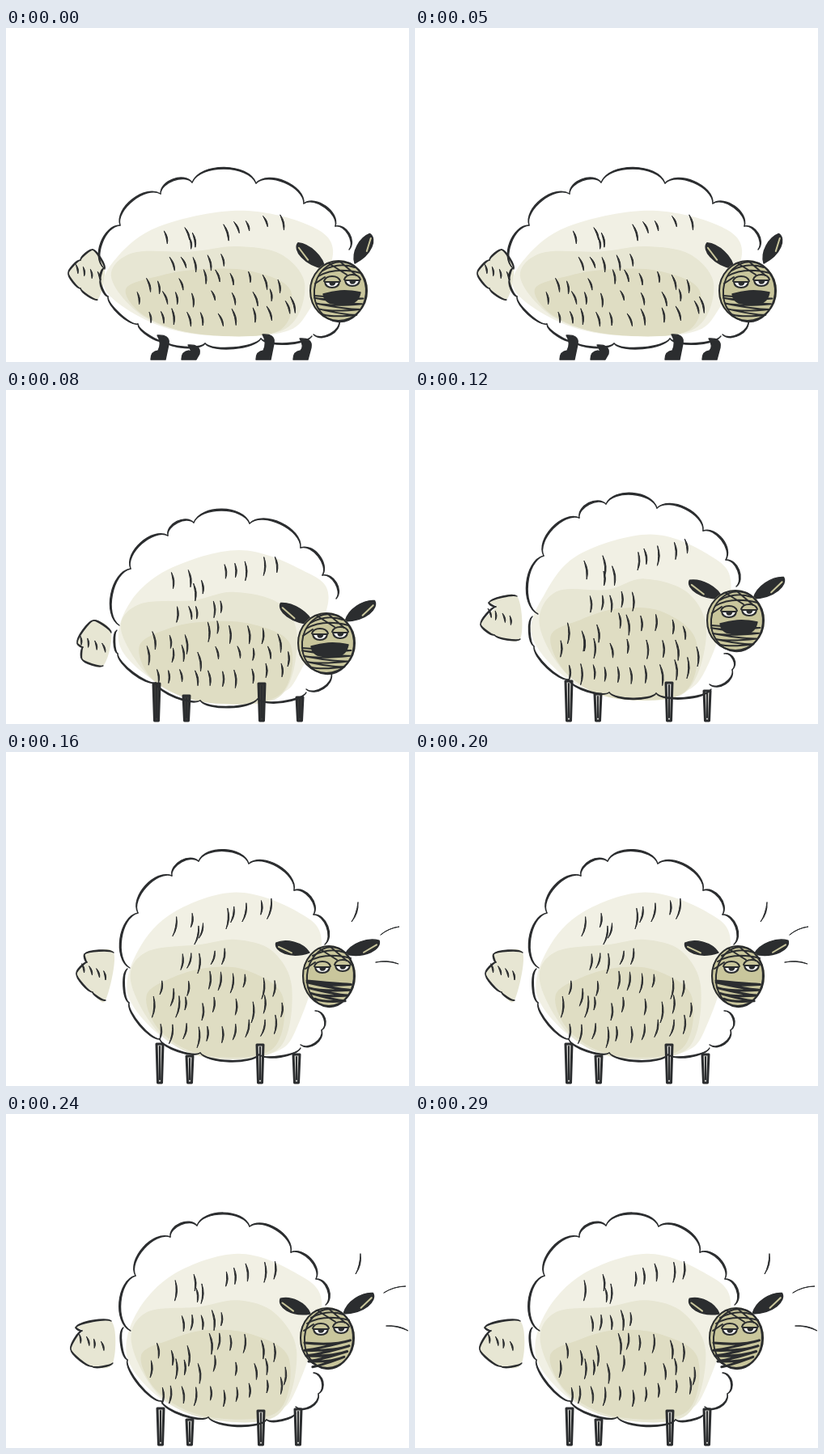
An HTML page for the animation above (0.32 s loop, 498 by 413 pixels).

```html
<!DOCTYPE html>
<html lang="en">
<head>
<meta charset="utf-8">
<title>Woolly sheep</title>
<style>
  html, body { margin: 0; width: 100%; height: 100%; overflow: hidden; background: #fff; }
  svg { display: block; width: 100%; height: 100%; }
  .pose { visibility: hidden; animation: 320ms step-end infinite; }
  #squash { animation-name: squash; }
  #rise { animation-name: rise; }
  #stretch { animation-name: stretch; }
  #hold { animation-name: hold; }
  #settle { animation-name: settle; }
  @keyframes squash { 0% { visibility: visible } 25%, 100% { visibility: hidden } }
  @keyframes rise { 0% { visibility: hidden } 25% { visibility: visible } 37.5%, 100% { visibility: hidden } }
  @keyframes stretch { 0% { visibility: hidden } 37.5% { visibility: visible } 50%, 100% { visibility: hidden } }
  @keyframes hold { 0% { visibility: hidden } 50% { visibility: visible } 75%, 100% { visibility: hidden } }
  @keyframes settle { 0% { visibility: hidden } 75%, 100% { visibility: visible } }
  .ink { fill: #2b2d2f; stroke: #2b2d2f; stroke-width: 1.4; stroke-linecap: round; stroke-linejoin: round; }
  .line { fill: none; stroke: #2b2d2f; stroke-width: 2; stroke-linecap: round; stroke-linejoin: round; }
  .bold { stroke-width: 3; }
  .tick { stroke-width: 1; }
  .light { fill: #f1f0e4; }
  .mid { fill: #e7e6d3; }
  .deep { fill: #dfddc3; }
  .skin { fill: #c9c69c; }
  .glint { stroke: #c9c69c; }
  .white { fill: #fff; }
  .dark { fill: #3a3b39; }
  .pale { fill: #d5d5d0; }
</style>
</head>
<body>
<svg viewBox="0 0 498 413" preserveAspectRatio="none"></svg>
<script>
const svg = document.querySelector('svg');

function groups(s, n = 2) {
  const a = s.trim().split(/\s+/).map(Number), out = [];
  for (let i = 0; i + n <= a.length; i += n) out.push(a.slice(i, i + n));
  return out;
}
const path = (cls, d) => `<path class="${cls}" d="${d}"/>`;

function random(seed) {
  return () => (seed = seed * 16807 % 2147483647) / 2147483647;
}

// Closed smooth shape through a few points
function blob(cls, p) {
  const n = p.length, at = i => p[(i + n) % n];
  let d = `M${p[0]}`;
  p.forEach((b, i) => {
    const a = at(i - 1), c = at(i + 1), e = at(i + 2);
    d += `C${b.map((v, k) => v + (c[k] - a[k]) / 6)} ${c.map((v, k) => v - (e[k] - b[k]) / 6)} ${c}`;
  });
  return path(cls, d + 'Z');
}

// Brush arc bulging to the left of its direction, thick in the middle
function arc([x, y], [u, v], bulge, base, thick) {
  const dx = u - x, dy = v - y, l = Math.hypot(dx, dy);
  const point = (f, h) => [x + dx * f + dy / l * h, y + dy * f - dx / l * h];
  const h = l * bulge + base, g = h - thick;
  return path('ink', `M${x} ${y}C${point(.12, h)} ${point(.88, h)} ${u} ${v}C${point(.88, g)} ${point(.12, g)} ${x} ${y}Z`);
}
const chain = (p, bulge, base, thick) =>
  p.slice(1).map((q, i) => arc(p[i], q, bulge, base, thick)).join('');

function tick(x, y, dx, dy) {
  const mx = x + dx / 2 + dy * .16, my = y + dy / 2 - dx * .16;
  return path('ink tick', `M${x} ${y}Q${mx + 1.4} ${my} ${x + dx} ${y + dy}Q${mx - 1.6} ${my + 1} ${x} ${y}Z`);
}

function ear([x, y, u, v]) {
  const l = Math.hypot(u - x, v - y), turn = Math.atan2(v - y, u - x) * 180 / Math.PI;
  return `<g transform="translate(${x} ${y}) rotate(${turn}) scale(1 ${u < x ? -1 : 1})">` +
    path('ink', `M0 0C${l / 4} -11 ${l * .75} -11 ${l} -3C${l} 8 ${l / 2} 13 0 0Z`) +
    path('line glint', `M${l / 2} 5L${l * .9} 1`) + '</g>';
}

const eye = (x, y) => `<g transform="translate(${x} ${y})">` +
  path('line', 'M-10 -3Q-8 -9 0 -9T10 -3') +
  path('line white', 'M-9 -2H9Q8 5 0 5T-9 -2Z') +
  path('ink', 'M-3 -2H4Q3 2 0 2T-3 -2Z') + '</g>';

function head([x, y, rx, slant], masked) {
  let zig = `M${6 - rx} 6`;
  for (let i = 1; i < 9; i++) {
    const side = i % 2 ? 1 : -1, h = 4 + i * 3.4;
    const w = Math.sqrt(1 - (h / 40) ** 2) * (rx - 5);
    zig += `Q${side * w * .3} ${h + 2} ${side * w} ${h + side * slant / 2}`;
  }
  return `<g transform="translate(${x} ${y})">` +
    `<ellipse class="skin" rx="${rx}" ry="38"/>` +
    `<ellipse class="line" rx="${rx - 1}" ry="37"/>` +
    `<ellipse class="line" cx="2" cy="1" rx="${rx - 4}" ry="37" transform="rotate(5)"/>` +
    path('line', 'M-20 -25Q0 -36 20 -29M-25 -18Q-4 -30 27 -22M-12 -34L10 -20M2 -36L22 -19M-29 -9L-17 -17') +
    path(masked ? 'line' : 'line bold', zig) +
    (masked ? path('ink', 'M-19 4Q-8 1 2 0T27 2Q25 13 15 16T-11 15Q-18 12 -19 4Z') : '') +
    eye(-8, -9) + eye(17, -11) + '</g>';
}

const leg = solid => ([x, top]) =>
  path(`line ${solid ? 'dark bold' : 'pale bold'}`, `M${x - 4} ${top}L${x - 2.5} 409h5L${x + 4} ${top}Z`) +
  path('line', `M${x} ${top + 3}V405`);
const hoof = ([x, y]) =>
  path('ink', `M${x - 3} ${y}Q${x + 13} ${y - 1} ${x + 11} ${y + 11}L${x + 7} 410H${x - 11}Q${x - 11} 400 ${x - 2} 399Q${x + 3} ${y + 10} ${x - 3} ${y}Z`);

// The fleece at full height; each pose squashes and shifts it
const shades = {
  light: groups('158 250 205 204 288 179 360 202 391 240 364 340 332 375 250 381 190 356 147 305'),
  mid: groups('152 288 174 250 238 245 285 235 334 252 358 300 336 374 250 381 190 354'),
  deep: groups('168 306 206 286 250 272 302 276 346 308 334 372 250 381 190 353')
};
const wool = groups(`212 210 230 205 235 222 242 217 273 199 284 197 297 193 318 190 332 187
  216 256 229 256 240 252 257 249 269 249 189 286 205 296 226 290 250 278 263 276 278 278 298 278 318 285 332 290
  178 308 210 308 222 309 240 314 260 306 285 310 305 312 323 308 346 316
  191 341 204 340 219 341 236 343 251 343 268 344 284 341 303 338 322 334 338 329`);

let seed = 40;
function pose(id, p) {
  const next = random(seed += 977), shake = n => (next() - .5) * n;
  const [sx, sy, dx, dy] = p.body;
  const place = ([x, y]) => [262 + (x - 262) * sx + dx, 372 + (y - 372) * sy + dy];
  const tail = groups(p.tail), mid = k => tail.reduce((s, q) => s + q[k], 0) / tail.length;

  const fur = wool.map(q => {
    const [x, y] = place(q);
    return tick(x + shake(6), y + shake(5), p.lean + shake(5), (21 + shake(11)) * sy);
  }).join('');
  const tuft = [-14, -5, 4, 13].map(d => tick(mid(0) + d, mid(1) - 6 + d / 3, 2 + shake(4), 11)).join('');
  const shade = Object.entries(shades).map(([cls, s]) =>
    blob(cls, s.map(place).map(([x, y]) => [x + shake(7), y + shake(5)]))).join('');

  svg.insertAdjacentHTML('beforeend', `<g class="pose" id="${id}">` +
    blob('mid', tail) + chain(tail, .12, 1, 1.6) + tuft + shade +
    groups(p.legs).map(p.hooves ? hoof : leg(p.solid)).join('') +
    chain(groups(p.cloud), .26, 5, 2.4) + chain(groups(p.chest), .26, 5, 2) +
    chain(groups(p.belly), .17, 1, 2) + fur +
    groups(p.ears, 4).map(ear).join('') + head(p.head, p.masked) +
    groups(p.marks || '', 4).map(m => tick(...m)).join('') + '</g>');
}

pose('squash', {
  body: [1.15, .76, -6, 1], lean: 4,
  tail: '113 336 92 322 77 303 92 287 107 274 122 298',
  cloud: '121 297 141 244 191 205 230 191 309 192 368 217 407 245 424 274',
  chest: '412 361 380 379',
  belly: '378 381 315 384 246 390 196 387 163 366 126 332 117 311 121 297',
  legs: '190 380 228 392 320 379 366 384', hooves: true,
  ears: '394 298 359 268 431 291 452 256',
  head: [411, 325, 36, 4], masked: true
});
pose('rise', {
  body: [1.05, .92, -2, 4], lean: 1,
  tail: '120 341 94 333 95 318 88 313 108 285 130 300',
  cloud: '140 291 154 221 200 180 232 164 301 165 364 195 391 229 408 258',
  chest: '402 350 371 370',
  belly: '371 374 311 382 240 384 185 362 138 326 137 297',
  legs: '186 363 223 378 316 363 363 380', solid: true,
  ears: '380 290 338 266 419 286 457 263',
  head: [396, 313, 36, 3], masked: true
});
pose('stretch', {
  body: [1, 1, 0, 0], lean: 1,
  tail: '130 308 98 303 81 290 100 268 91 263 126 255',
  cloud: '152 277 159 205 203 158 236 141 299 146 356 174 384 210 397 243',
  chest: '382 326 392 346 364 364',
  belly: '366 370 298 375 240 374 190 358 147 317 145 280',
  legs: '190 360 226 376 314 362 361 372',
  ears: '380 258 338 238 418 258 457 234',
  head: [396, 285, 36, 3], masked: true
});
pose('hold', {
  body: [.97, 1, 0, -5], lean: -3,
  tail: '123 307 107 297 87 274 100 260 97 250 133 248',
  cloud: '153 267 163 199 205 153 238 135 300 138 356 171 380 201 394 238',
  chest: '382 320 390 344 364 362',
  belly: '364 366 313 374 240 372 190 355 152 310 150 268',
  legs: '190 361 227 376 314 362 359 374',
  ears: '375 248 333 239 419 250 462 236',
  head: [399, 277, 33, 6],
  marks: '435 186 -8 24 463 226 23 -10 457 260 28 2'
});
pose('settle', {
  body: [1, 1.01, 0, -4], lean: 0,
  tail: '132 308 106 312 80 291 94 268 86 264 130 256',
  cloud: '154 268 160 200 203 152 236 138 301 139 352 171 383 204 395 236',
  chest: '380 320 386 346 358 362',
  belly: '358 370 322 378 250 375 192 355 150 304 145 264',
  legs: '191 364 227 378 315 367 361 365',
  ears: '376 247 338 231 417 247 455 224',
  head: [397, 277, 34, -9],
  marks: '438 173 -6 25 467 221 27 -8 470 262 27 6'
});
</script>
</body>
</html>
```
